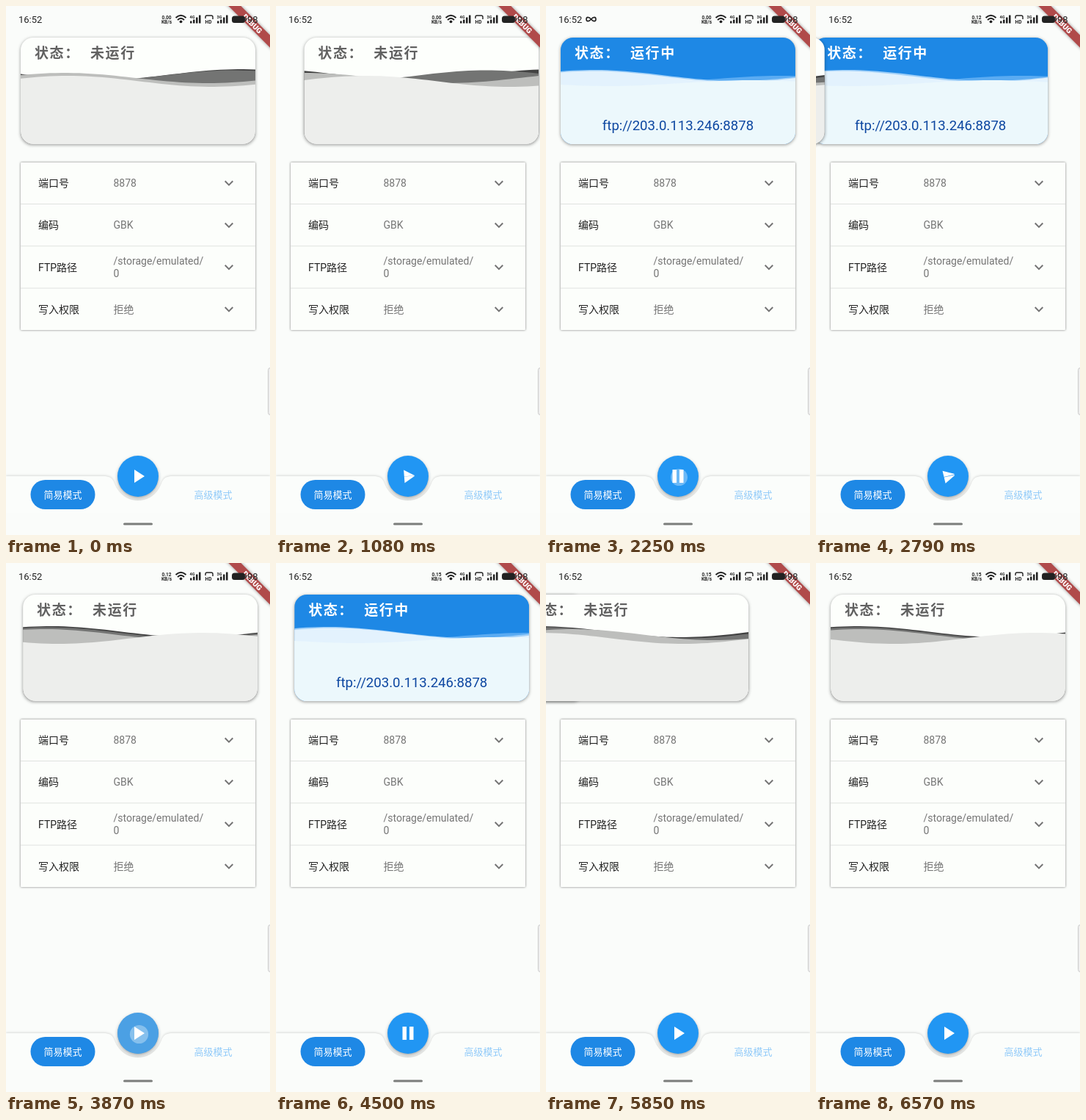
An HTML page that plays this animation: 360x720 px, repeating every 6.66 s.

```html
<!DOCTYPE html>
<html lang="zh-CN">
<head>
<meta charset="utf-8">
<style>
  html, body { margin: 0; width: 100%; height: 100%; overflow: hidden; background: #fafcfa; }
  svg { display: block; width: 360px; height: 720px; }
  text { font-family: Roboto, "Noto Sans CJK SC", "Noto Sans CJK", sans-serif; }
  .card { filter: drop-shadow(0 1px 2px #0006); }
  .title { font-size: 19px; font-weight: 700; letter-spacing: 1.6px; }
  .tiny { font-size: 6.5px; font-weight: 700; text-anchor: middle; fill: #222; }
  .mode { font-size: 13px; text-anchor: middle; font-weight: 500; }
</style>
</head>
<body>
<svg viewBox="0 0 360 720">
  <defs>
    <clipPath id="cardShape"><rect x="20" y="43" width="320" height="145" rx="17"/></clipPath>
    <clipPath id="fabShape"><circle cx="180" cy="640" r="28"/></clipPath>
  </defs>
  <rect width="360" height="720" fill="#fafcfa"/>

  <g id="cards"></g>

  <g id="settings">
    <rect x="20" y="213" width="320" height="228" rx="1" fill="#fcfefb" style="filter:drop-shadow(0 0 1.500px #0008)"/>
  </g>

  <rect x="357.500" y="492.500" width="8" height="64" rx="3" fill="#eee" stroke="#ccc"/>

  <path d="M0 640H133C148 640 146 649 152 657.500A33 33 0 0 0 208 657.500C214 649 212 640 227 640H360V690H0Z"
        fill="#fbfdfb" style="filter:drop-shadow(0 -1px 1.500px #0002)"/>
  <rect y="690" width="360" height="30" fill="#fafcfa"/>
  <rect x="33.500" y="645" width="88" height="40" rx="20" fill="#1e88e5"/>
  <text class="mode" x="77.500" y="670" fill="#fff">简易模式</text>
  <text class="mode" x="282.500" y="670" fill="#90caf9">高级模式</text>
  <rect x="160" y="703.500" width="40" height="3" rx="1.500" fill="#7b7d7b"/>

  <circle cx="180" cy="640" r="28" fill="#2196f3" style="filter:drop-shadow(0 2px 2px #0005)"/>
  <g clip-path="url(#fabShape)">
    <circle id="highlight" cx="180" cy="640" r="28" fill="#adb7c1"/>
    <path id="icon" fill="#fff"/>
    <circle id="ripple" cx="181.500" cy="641.500" fill="#fff"/>
  </g>

  <g transform="translate(360 0) rotate(45)">
    <rect x="-44" y="28" width="88" height="12" fill="#b04a4a" style="filter:drop-shadow(0 0 2px #0006)"/>
    <text y="37.700" font-size="10.200" font-weight="900" text-anchor="middle" fill="#fff">DEBUG</text>
  </g>

  <g id="status" fill="#222">
    <text x="17" y="23" font-size="13">16:52</text>
    <path id="link" d="M61.500 18C58.500 14.500 55 14.500 55 18S58.500 21.500 61.500 18S68 14.500 68 18S64.500 21.500 61.500 18" fill="none" stroke="#222" stroke-width="1.600"/>
    <text id="speed" class="tiny" x="219" y="17.500"></text>
    <text class="tiny" x="219" y="23.500">KB/s</text>
    <g fill="none" stroke="#222" stroke-width="2">
      <path d="M231.500 16Q238.500 9.500 245.500 16M234 19Q238.500 14.500 243 19"/>
      <path d="M272 17V15Q272 13 274 13H280Q282 13 282 15V18" stroke-width="1.400"/>
    </g>
    <circle cx="238.500" cy="21.300" r="1.900"/>
    <text class="tiny" x="276" y="23.500">HD</text>
    <g id="signals"></g>
    <rect x="308" y="13.500" width="18" height="9.500" rx="3.500"/>
    <rect x="326.500" y="16" width="1.500" height="4.500"/>
    <text x="329" y="23" font-size="13">98</text>
  </g>
</svg>

<script>
const LOOP = 6660, SLIDE_MS = 1000, SLIDE_PX = 352, ICON_DELAY = 10, ICON_MS = 480, WAVELENGTH = 390;
// Moments when the server toggles: on, off, on, off.
const TOGGLES = [1007, 2418, 3860, 5300];

const $ = id => document.getElementById(id);
const clamp = v => Math.min(1, Math.max(0, v));
const smooth = v => v * v * (3 - 2 * v);
const mix = (a, b, p) => a + (b - a) * p;

function add(parent, tag, attrs, text = '') {
  const node = document.createElementNS('http://www.w3.org/2000/svg', tag);
  for (const key in attrs) node.setAttribute(key, attrs[key]);
  node.textContent = text;
  return parent.appendChild(node);
}

// Cubic ease-in-out with a pull back at both ends.
function easeInOutBack(x) {
  const cubic = (u, a, b) => 3 * (1 - u) ** 2 * u * a + 3 * (1 - u) * u * u * b + u ** 3;
  let low = 0, high = 1;
  for (let i = 0; i < 24; i++) {
    const mid = (low + high) / 2;
    if (cubic(mid, 0.68, 0.265) < x) low = mid; else high = mid;
  }
  return cubic(low, -0.55, 1.55);
}

function makeCard(state, back, ink, colors) {
  const root = add($('cards'), 'g', { class: 'card' });
  const body = add(root, 'g', { 'clip-path': 'url(#cardShape)' });
  add(body, 'rect', { x: 20, y: 43, width: 320, height: 145, fill: back });
  const waves = colors.map(fill => add(body, 'path', { fill }));
  add(root, 'text', { class: 'title', x: 39, y: 71, fill: ink }, '状态：');
  add(root, 'text', { class: 'title', x: 115, y: 71, fill: ink }, state);
  return { root, waves };
}

const stopped = makeCard('未运行', '#fdfffc', '#616161', ['#424242', '#737473', '#bdbebc', '#edeeec']);
const running = makeCard('运行中', '#1e88e5', '#fff', ['#5aabf2', '#9fcff8', '#e3f2fd', '#ecf8fc']);
add(running.root, 'text', { x: 180, y: 169, 'font-size': 18.6, 'text-anchor': 'middle', fill: '#0d47a1' },
  'ftp://203.0.113.246:8878');

// Each layer: mean height, amplitude, crest position, crest speed in px/s.
const STOPPED_FIRST = [[93.5, 7.5, 300, 37], [95, 7.5, 290, -38], [98, 7, 60, -55], [102.5, 7.5, 65, 18]];
const STOPPED_NEW = [[93.5, 7.5, 36, 5], [95, 7.5, 36, -5], [97.5, 7.5, 40, -55], [102.5, 7.5, 285, -200]];
const RUNNING = [[100, 5, 300, -30], [94.5, 7.5, 45, 0], [96, 7.5, 45, -10], [105, 4, 260, -30]];

function drawWaves(card, layers, seconds) {
  layers.forEach(([level, height, crest, speed], i) => {
    let d = 'M20 190';
    for (let x = 0; x <= 320; x += 8) {
      const y = level - height * Math.cos((x - crest - speed * seconds) * 2 * Math.PI / WAVELENGTH);
      d += `L${x + 20} ${y.toFixed(2)}`;
    }
    card.waves[i].setAttribute('d', d + 'L340 190Z');
  });
}

// Both halves of the pause sign (p = 0) turning into the play sign (p = 1).
function iconPath(p) {
  const half = side => 'M' + [
    [mix(7.5, 0, p), -9], [mix(2, 0, p), -9], [mix(2, 0, p), mix(9, 5, p)], [mix(7.5, 9, p), mix(9, 5, p)]
  ].map(([x, y]) => `${side * x} ${y}`).join('L') + 'Z';
  return half(-1) + half(1);
}

[[258, '4G'], [295, '3G']].forEach(([x, label]) => {
  add($('signals'), 'text', { class: 'tiny', x: x - 4, y: 17, style: 'font-size:5.5px' }, label);
  for (let i = 0; i < 4; i++) {
    const h = [3, 5, 8, 11][i];
    add($('signals'), 'rect', { x: x - 7 + i * 4, y: 23.5 - h, width: 2.5, height: h });
  }
});

[['端口号', '8878'], ['编码', 'GBK'], ['FTP路径', '/storage/emulated/', '0'], ['写入权限', '拒绝']]
  .forEach(([label, ...lines], i) => {
    const y = 241 + i * 57.25, list = $('settings');
    if (i) add(list, 'path', { d: `M20 ${y - 28.75}H340`, stroke: '#e0e2e0' });
    add(list, 'text', { x: 44, y: y + 5, 'font-size': 14, fill: '#222' }, label);
    lines.forEach((line, n) => add(list, 'text', {
      x: 146.5, y: y + 5 + (n - (lines.length - 1) / 2) * 17, 'font-size': 14, fill: '#757575'
    }, line));
    add(list, 'path', { d: `M298.700 ${y - 2.7}l5.300 5.300l5.300 -5.300`, fill: 'none', stroke: '#757575', 'stroke-width': 2 });
  });

function drawCards(t, last) {
  const start = TOGGLES[last];
  const isRunning = last >= 0 && last % 2 === 0;
  const incoming = isRunning ? running : stopped;
  const outgoing = isRunning ? stopped : running;
  const slide = last < 0 ? 1 : easeInOutBack(clamp((t - start) / SLIDE_MS));
  if ($('cards').lastChild !== incoming.root) $('cards').append(incoming.root);
  incoming.root.setAttribute('transform', `translate(${-SLIDE_PX * (1 - slide)} 0)`);
  outgoing.root.setAttribute('transform', `translate(${-SLIDE_PX * slide} 0)`);

  const age = since => (t - since) / 1000 - 1.25;
  if (t < TOGGLES[1]) drawWaves(stopped, STOPPED_FIRST, t / 1000);
  else drawWaves(stopped, STOPPED_NEW, age(t < TOGGLES[3] ? TOGGLES[1] : TOGGLES[3]));
  drawWaves(running, RUNNING, age(t < TOGGLES[2] ? TOGGLES[0] : TOGGLES[2]));
}

function drawButton(t, last) {
  const turn = last < 0 ? 1 : smooth(clamp((t - TOGGLES[last] - ICON_DELAY) / ICON_MS));
  const play = last % 2 === 0 ? 1 - turn : turn;
  $('icon').setAttribute('d', iconPath(play));
  $('icon').setAttribute('transform', `translate(180 640) rotate(${90 * play})`);

  const press = TOGGLES.map(s => t - s).find(d => d > -220 && d < 90);
  const active = press !== undefined;
  const fade = active ? 1 - clamp((press - 20) / 50) : 0;
  $('highlight').setAttribute('opacity', active ? 0.3 * clamp((press + 170) / 150) * fade : 0);
  $('ripple').setAttribute('opacity', 0.33 * fade);
  $('ripple').setAttribute('r', active ? 11.5 + Math.max(0, press) * 0.1 : 0);
}

function frame() {
  const t = performance.now() % LOOP;
  const last = TOGGLES.filter(s => s <= t).length - 1;
  drawCards(t, last);
  drawButton(t, last);
  $('speed').textContent = t < 2500 ? '0.00' : t < 4400 ? '0.12' : '0.15';
  $('link').setAttribute('opacity', t > 1500 && t < 2500 ? 1 : 0);
  requestAnimationFrame(frame);
}
frame();
</script>
</body>
</html>
```
